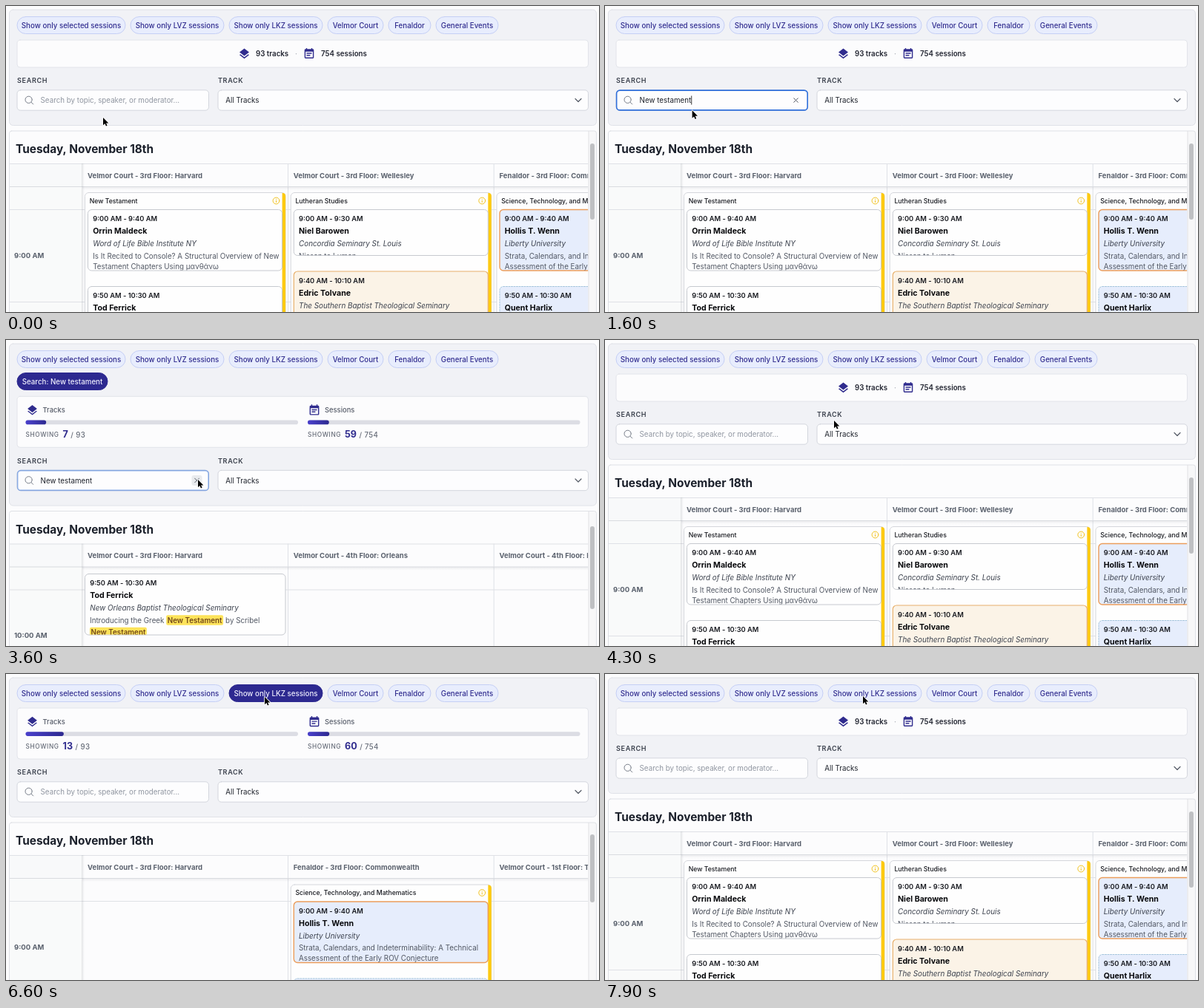
Write an HTML page with a canvas that moves like this. It is 800x414 px and loops after 8 s.

```html
<!DOCTYPE html>
<html lang="en">
<head>
<meta charset="utf-8">
<title>Conference schedule</title>
<style>
html, body { margin: 0; width: 100%; height: 100%; overflow: hidden; background: #fcfcfd; }
canvas { display: block; width: 800px; height: 414px; }
</style>
</head>
<body>
<canvas id="stage"></canvas>
<script>
const W = 800, H = 414, LOOP = 8000, STEP = 100;
const INDIGO = '#302c8e', GREY = '#666c78', HEAD = '#5a616d', INK = '#17191f', LINE = '#dfe1e6';
const RIGHT = 785.5, COL = 277.75;

const canvas = document.getElementById('stage');
const ctx = canvas.getContext('2d');
const dpr = window.devicePixelRatio || 1;
canvas.width = W * dpr;
canvas.height = H * dpr;

const layers = new Path2D('M12 16 21 9 12 2 3 9zM12 18.54 4.62 12.81 3 14.07l9 7 9-7-1.63-1.27z');
const notes = new Path2D('M17 10H7v2h10zM19 3h-1V1h-2v2H8V1H6v2H5a2 2 0 0 0-2 2v14a2 2 0 0 0 2 2h14a2 2 0 0 0 2-2V5a2 2 0 0 0-2-2zm0 16H5V8h14zM14 14H7v2h7z');
const arrow = new Path2D('M0 0V11.2L2.6 8.8 4.3 12.6 6.1 11.8 4.4 8.1H8z');

const clamp = v => Math.max(0, Math.min(1, v));
const ease = v => v * v * (3 - 2 * v);

// Text is placed by its left edge and the middle of its capitals.
function text(str, x, y, size, weight = 400, color = INK, opt = {}) {
  ctx.font = `${opt.italic ? 'italic ' : ''}${weight} ${size}px Inter, sans-serif`;
  ctx.letterSpacing = (opt.spacing || 0) + 'px';
  ctx.textAlign = opt.align || 'left';
  ctx.fillStyle = color;
  ctx.fillText(str, x, y + size * 0.363);
  return ctx.measureText(str).width;
}

function box(x, y, w, h, r, fill, stroke, lw = 1, dash = []) {
  ctx.beginPath();
  ctx.roundRect(x, y, w, h, r);
  if (fill) { ctx.fillStyle = fill; ctx.fill(); }
  if (stroke) {
    ctx.strokeStyle = stroke;
    ctx.lineWidth = lw;
    ctx.setLineDash(dash);
    ctx.stroke();
    ctx.setLineDash([]);
  }
}

function rect(x, y, w, h, color) {
  ctx.fillStyle = color;
  ctx.fillRect(x, y, w, h);
}

function stroke(points, color, lw) {
  ctx.beginPath();
  points.forEach(([x, y]) => ctx.lineTo(x, y));
  ctx.strokeStyle = color;
  ctx.lineWidth = lw;
  ctx.lineCap = ctx.lineJoin = 'round';
  ctx.stroke();
}

function clipped(x, y, w, h, draw) {
  ctx.save();
  ctx.beginPath();
  ctx.rect(x, y, w, h);
  ctx.clip();
  draw();
  ctx.restore();
}

function icon(path, cx, cy, size) {
  ctx.save();
  ctx.translate(cx, cy);
  ctx.scale(size, size);
  ctx.translate(-12, -11.5);
  ctx.fillStyle = INDIGO;
  ctx.fill(path, 'evenodd');
  ctx.restore();
}

// Timeline

const cursorKeys = [
  [0, 131, 151], [300, 99, 135.5], [1400, 99, 135.5], [2400, 278, 191.5],
  [2800, 278, 191.5], [3400, 259, 189], [3800, 259, 189], [4800, 359, 29],
  [5100, 359, 29], [6500, 349, 31], [7900, 348, 30]
];

function cursorAt(t) {
  const i = cursorKeys.findIndex(k => k[0] > t);
  if (i < 0) return cursorKeys[cursorKeys.length - 1].slice(1);
  const [t0, x0, y0] = cursorKeys[i - 1], [t1, x1, y1] = cursorKeys[i];
  const p = ease((t - t0) / (t1 - t0));
  return [x0 + (x1 - x0) * p, y0 + (y1 - y0) * p];
}

const views = {
  all: { shift: 0, thumb: [186, 103] },
  search: { shift: 62.5, thumb: [252, 112], tracks: 7, sessions: 59 },
  group: { shift: 32, thumb: [217, 92], tracks: 13, sessions: 60 }
};

function viewAt(t) {
  if (t >= 1700 && t < 3800) return 'search';
  return t >= 5000 && t < 7800 ? 'group' : 'all';
}

const QUERY = 'New testament';
const typedAt = t => t < 500 || t >= 3700 ? '' : QUERY.slice(0, Math.floor((t - 500) / 65) + 1);
const focusAt = t => clamp((t - 150) / 100) * (1 - clamp((t - 3500) / 200));
const caretAt = t => t >= 250 && t < 3500 && (t < 1400 || (t - 1400) % 1100 < 550);

// Filter panel

const pills = [
  ['Show only selected sessions', 15, 146], ['Show only LVZ sessions', 168, 126],
  ['Show only LKZ sessions', 301, 126], ['Velmor Court', 434, 75],
  ['Fenaldor', 516, 57], ['General Events', 580, 84]
];

function pill(label, x, y, w, on) {
  box(x, y - 11.5, w, 23, 11.5, on ? '#2d2990' : '#e8edfd', on ? '#2d2990' : '#c5cff5');
  text(label, x + w / 2, y, 9.75, 500, on ? '#f2f2ff' : INDIGO, { align: 'center' });
}

function meter(x, top, path, label, n, total) {
  icon(path, x + 9, top + 18.5, 0.71);
  text(label, x + 23, top + 18.7, 9.4, 500, '#555b68');
  box(x, top + 32.3, 367.5, 5.6, 2.8, '#dcdde4');
  const w = 367.5 * n / total;
  const g = ctx.createLinearGradient(x, 0, x + w, 0);
  g.addColorStop(0, '#4a40cc');
  g.addColorStop(1, '#2d2990');
  box(x, top + 32.3, w, 5.6, 2.8, g);
  text('SHOWING', x, top + 52, 8.3, 500, GREY, { spacing: 0.6 });
  const nw = text(n, x + 50, top + 51.3, 12.6, 700, INDIGO);
  text('/ ' + total, x + 53.5 + nw, top + 52, 9.72, 500, GREY, { spacing: 0.35 });
}

function stats(view, top) {
  const open = view.tracks;
  box(15, top, 770.5, open ? 69 : 37, 4, '#fcfcfd', '#e2e4ea');
  if (open) {
    meter(26.5, top, layers, 'Tracks', view.tracks, 93);
    meter(407, top, notes, 'Sessions', view.sessions, 754);
    return;
  }
  icon(layers, 321.5, 64.3, 0.72);
  text('93 tracks', 337, 64.5, 9.72, 600, '#20232f');
  text('·', 390, 64.5, 9.72, 500, '#a5a9b3');
  icon(notes, 409, 64.3, 0.7);
  text('754 sessions', 425, 64.5, 9.72, 600, '#20232f');
}

function searchField(t, y) {
  const focus = focusAt(t), typed = typedAt(t);
  box(15, y - 13.7, 258.5, 27.4, 4.5, '#fdfdfe', '#d3d6dd');
  if (focus) {
    ctx.globalAlpha = focus;
    box(15.6, y - 13.4, 257.6, 26.8, 4.5, null, '#2f6fdb', 1.6);
    ctx.globalAlpha = 1;
  }
  ctx.beginPath();
  ctx.arc(30.6, y - 0.7, 4.6, 0, 7);
  ctx.strokeStyle = '#777d89';
  ctx.lineWidth = 1;
  ctx.stroke();
  stroke([[34, y + 2.7], [36.7, y + 5.4]], '#777d89', 1);
  let end = 46.6;
  if (typed) {
    end += text(typed, 46.6, y, 9.78, 400, '#1f232c');
    if (t >= 3300) box(250.5, y - 7, 14, 14, 3, '#e9ebee');
    stroke([[254.7, y - 2.8], [260.3, y + 2.8]], '#555b66', 1);
    stroke([[260.3, y - 2.8], [254.7, y + 2.8]], '#555b66', 1);
  } else {
    text('Search by topic, speaker, or moderator...', 46.6, y, 9.78, 400, '#9096a1');
  }
  if (caretAt(t)) rect(end + 0.2, y - 6, 0.9, 12, '#222');
}

function panel(t, name, view) {
  const s = view.shift;
  box(4.5, 5, 792, 156.5 + s, 5, '#f1f2f6', '#e0e2e8');
  pills.forEach(([label, x, w], i) => pill(label, x, 26, w, name === 'group' && i === 2));
  if (name === 'search') pill('Search: ' + QUERY, 15, 56, 122, true);
  stats(view, name === 'search' ? 76.3 : 46);
  text('SEARCH', 15, 101 + s, 9.05, 600, '#3b414d', { spacing: 0.65 });
  text('TRACK', 286, 101 + s, 9.05, 600, '#3b414d', { spacing: 0.65 });
  const y = 127.5 + s;
  searchField(t, y);
  box(286, y - 13.7, 499.5, 27.4, 4.5, '#fdfdfe', '#d3d6dd');
  text('All Tracks', 296.3, y, 9.78, 400, '#1f232c');
  stroke([[768, y - 2], [772, y + 2], [776, y - 2]], '#555b66', 1.2);
}

// Calendar

const BLUE = { bg: '#e6edfc', border: '#eb9d5b', lw: 1.4 };
const CREAM = { bg: '#fbf3e7', border: '#e8b06c', lw: 1.2 };
const DASHED = { bg: '#e6edfc', border: '#a4c4dc', dash: [2, 1.5] };
const talk = ['9:00 AM - 9:40 AM', 'Hollis T. Wenn', 'Liberty University',
  'Strata, Calendars, and Indeterminability: A Technical', 'Assessment of the Early ROV Conjecture'];

function card(x, y, h, [time, name, place, ...body], look = {}, w = 262) {
  box(x, y, w, h, 5, look.bg || '#fefefe', look.border || '#c6c9cf', look.lw || 1, look.dash);
  clipped(x, y, w, h - 0.5, () => {
    text(time, x + 6.7, y + 12.5, 9.3, 600, INK);
    text(name, x + 6.7, y + 29, 10.6, 700, '#08090c');
    text(place, x + 6.7, y + 46, 9.9, 400, '#3c424e', { italic: true });
    body.forEach((line, i) => text(line, x + 6.7, y + 62.5 + 14 * i, 9.8, 400, '#525864'));
  });
}

function group(col, y, title) {
  const x = 106.5 + COL * col;
  box(x, y, 270.5, 220, 5, '#fefefe', '#d5d7dc');
  box(x + 266.1, y + 0.6, 4.5, 220, [0, 4, 0, 0], '#fdca12');
  text(title, x + 6.2, y + 11, 8.7, 500, INK);
  ctx.beginPath();
  ctx.arc(x + 258, y + 11, 4.4, 0, 7);
  ctx.strokeStyle = '#f2c21c';
  ctx.lineWidth = 1;
  ctx.stroke();
  rect(x + 257.5, y + 10.4, 1, 3, '#f2c21c');
  rect(x + 257.5, y + 8.4, 1, 1, '#f2c21c');
}

function mark(x, y) {
  const label = 'New Testament';
  ctx.font = '600 9.8px Inter, sans-serif';
  ctx.letterSpacing = '0px';
  box(x - 1.5, y - 6.7, ctx.measureText(label).width + 3, 13.4, 2, '#fde35a');
  return text(label, x, y, 9.8, 600, '#72481a');
}

const schedule = {
  all() {
    group(0, 252.5, 'New Testament');
    card(110.5, 275.5, 82.5, ['9:00 AM - 9:40 AM', 'Orrin Maldeck', 'Word of Life Bible Institute NY',
      'Is It Recited to Console? A Structural Overview of New', 'Testament Chapters Using μανθάνω']);
    card(110.5, 379.5, 82.5, ['9:50 AM - 10:30 AM', 'Tod Ferrick', '']);
    group(1, 252.5, 'Lutheran Studies');
    card(388.3, 275.5, 62, ['9:00 AM - 9:30 AM', 'Niel Barowen', 'Concordia Seminary St. Louis', 'Nissen to Lumen']);
    card(388.3, 359, 82.5, ['9:40 AM - 10:10 AM', 'Edric Tolvane', 'The Southern Baptist Theological Seminary'], CREAM);
    group(2, 252.5, 'Science, Technology, and Mathematics');
    card(666, 275.5, 82.5, talk, BLUE);
    card(666, 379.5, 82.5, ['9:50 AM - 10:30 AM', 'Quent Harlix', ''], DASHED);
  },
  search() {
    card(106.5, 316.5, 82.5, ['9:50 AM - 10:30 AM', 'Tod Ferrick', 'New Orleans Baptist Theological Seminary'], {}, 270.5);
    clipped(107, 317, 269, 81.5, () => {
      let x = 113 + text('Introducing the Greek ', 113, 379, 9.8, 400, '#525864') + 1.5;
      x += mark(x, 379) + 1.8;
      text(' by Scribel', x, 379, 9.8, 400, '#525864');
      mark(114.5, 395.5);
    });
  },
  group() {
    group(1, 285, 'Science, Technology, and Mathematics');
    card(388.3, 308, 82.5, talk, BLUE);
    card(388.3, 412, 82.5, ['9:50 AM - 10:30 AM', 'Quent Harlix', ''], DASHED);
  }
};

const rooms = {
  all: ['Velmor Court - 3rd Floor: Harvard', 'Velmor Court - 3rd Floor: Wellesley', 'Fenaldor - 3rd Floor: Commonwealth'],
  search: ['Velmor Court - 3rd Floor: Harvard', 'Velmor Court - 4th Floor: Orleans', 'Velmor Court - 4th Floor: Hyannis'],
  group: ['Velmor Court - 3rd Floor: Harvard', 'Fenaldor - 3rd Floor: Commonwealth', 'Velmor Court - 1st Floor: Tremont']
};

function calendar(name, view) {
  const s = view.shift, head = 213 + s, body = 245 + s;
  rect(4.5, 169 + s, 792, H, '#fcfcfd');
  rect(5, body, 98, H, '#f9fafa');
  rect(5, head, 98, 32, '#f8f9fa');
  clipped(4, 169 + s, RIGHT - 4, H, () => {
    rect(5, 275 + s, W, 1, LINE);
    rect(5, 400 + s, W, 1, LINE);
    [380, 657.7].forEach(x => rect(x, head, 1, H, LINE));
    schedule[name]();
    rect(5, head, W, 1, LINE);
    rect(5, body - 1, W, 1, '#d9dbe0');
    const g = ctx.createLinearGradient(0, body, 0, body + 4);
    g.addColorStop(0, 'rgba(40,45,60,.07)');
    g.addColorStop(1, 'rgba(40,45,60,0)');
    rect(103, body, W, 4, g);
    const edge = ctx.createLinearGradient(102, 0, 106, 0);
    edge.addColorStop(0, 'rgba(40,45,60,.11)');
    edge.addColorStop(1, 'rgba(40,45,60,0)');
    rect(102, head, 4, H, edge);
    rooms[name].forEach((room, i) => text(room, 110 + COL * i, 229.5 + s, 9.5, 650, HEAD));
  });
  text('Tuesday, November 18th', 13, 193.8 + s, 15.4, 700, '#1b202b');
  text(name === 'search' ? '10:00 AM' : '9:00 AM', 11, 337.5 + s, 9.5, 650, HEAD);
  rect(RIGHT, 169 + s, 11, H, '#f7f7f8');
  rect(RIGHT, 169 + s, 1, H, '#e1e2e5');
  box(788, view.thumb[0], 6, view.thumb[1], 3, '#bfc0c3');
  box(4.5, 169 + s, 792, 420, 3, null, LINE);
}

function cursor(t) {
  const [x, y] = cursorAt(t);
  ctx.save();
  ctx.translate(x, y);
  ctx.scale(0.92, 0.92);
  ctx.strokeStyle = '#fff';
  ctx.lineWidth = 1.8;
  ctx.lineJoin = 'round';
  ctx.stroke(arrow);
  ctx.fillStyle = '#000';
  ctx.fill(arrow);
  ctx.restore();
}

function draw(t) {
  const name = viewAt(t), view = views[name];
  ctx.setTransform(dpr, 0, 0, dpr, 0, 0);
  rect(0, 0, W, H, '#fcfcfd');
  panel(t, name, view);
  calendar(name, view);
  cursor(t);
}

let start;
function tick(now) {
  start ??= now;
  draw(Math.floor(((now - start) % LOOP) / STEP) * STEP);
  requestAnimationFrame(tick);
}
draw(0);
requestAnimationFrame(tick);
</script>
</body>
</html>
```
